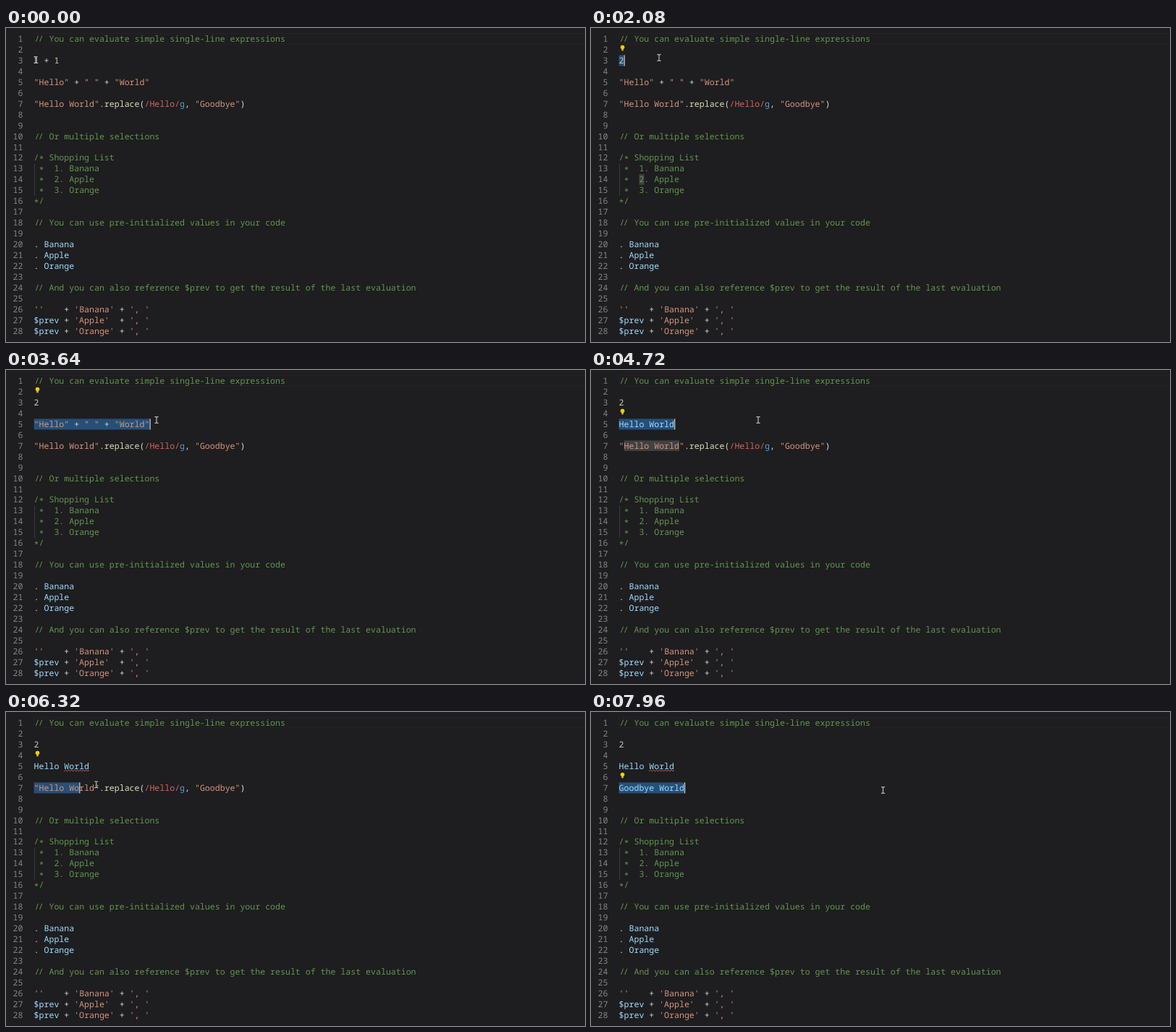
Animation, 800 px wide and 434 px high, one loop 8 s. Source, as an HTML page:

```html
<!DOCTYPE html>
<html lang="en">
<head>
<meta charset="utf-8">
<title>Evaluating expressions in an editor</title>
<style>
  html, body { margin: 0; width: 100%; height: 100%; overflow: hidden; background: #1e1d1f; }
  svg { display: block; width: 100vw; height: 100vh; }
  text {
    font: 500 11.59px "Noto Sans Mono", "DejaVu Sans Mono", monospace;
    white-space: pre; text-rendering: geometricPrecision; fill: #dadada;
  }
  .num { fill: #858585; text-anchor: end; font-weight: 400; }
  .comment { fill: #629650; font-weight: 400; }
  .string { fill: #d4957c; }
  .regex { fill: #d1665e; }
  .flag { fill: #569cd6; }
  .value { fill: #c0d2b4; }
  .name { fill: #9cdcfe; }
  .call { fill: #dcdcb4; }
</style>
</head>
<body>
<svg viewBox="0 0 800 434">
  <rect width="800" height="434" fill="#1e1d1f"/>
  <rect x="38.5" y="7.5" width="765" height="14.5" fill="none" stroke="#242325"/>
  <path d="M39.5 187.5V232" stroke="#3a3a3c"/>
  <rect id="match" height="14.5" fill="#404143"/>
  <rect id="selection" height="15" fill="#264f78"/>
  <g id="code"></g>
  <path id="squiggle" fill="none" stroke="#d8675c" stroke-width=".9"/>
  <rect id="caret" width="1.2" height="15" fill="#d0d0cc"/>
  <g id="bulb">
    <circle r="2.8" cy="-1" fill="#ffcc00"/>
    <path d="M-1.3 1.6h2.6v2.2h-2.6z" fill="#d9b866"/>
  </g>
  <g id="mouse">
    <path id="beam" d="M-2.5 -4.3H-1L0 -3.5L1 -4.3H2.5M0 -3.5V3.5M-2.5 4.3H-1L0 3.5L1 4.3H2.5"
      fill="none" stroke="#bcbcbc" stroke-width="1.2"/>
    <path id="arrow" d="M0 0V7.6L1.8 6L3 8.8L4.4 8.2L3.2 5.5H5.6Z"
      fill="#e8e8e8" stroke="#111" stroke-width=".6"/>
  </g>
</svg>
<script>
const LOOP = 8000, LEFT = 38.6, CHAR = 6.954, ROW = 14.98;
const $ = id => document.getElementById(id);
const rowY = row => 15 + (row - 1) * ROW;
const colX = col => LEFT + col * CHAR;

const source = `// You can evaluate simple single-line expressions

1 + 1

"Hello" + " " + "World"

"Hello World".replace(/Hello/g, "Goodbye")


// Or multiple selections

/* Shopping List
 *  1. Banana
 *  2. Apple
 *  3. Orange
*/

// You can use pre-initialized values in your code

. Banana
. Apple
. Orange

// And you can also reference $prev to get the result of the last evaluation

''    + 'Banana' + ', '
$prev + 'Apple'  + ', '
$prev + 'Orange' + ', '`.split("\n");

// Each step drags over a row, then replaces it with its result.
const steps = [
  { row: 3, start: 150, stop: 700, bulb: 1000, edit: 1800, result: "2", match: [14, 4] },
  { row: 5, start: 3000, stop: 3480, bulb: 3900, edit: 4480, result: "Hello World", match: [7, 1] },
  { row: 7, start: 6000, stop: 7030, bulb: 7100, edit: 7600, result: "Goodbye World" }
];

const mousePath = [
  [0, 41, 44], [150, 41, 44], [700, 94, 41], [2350, 94, 41], [2640, 34, 77],
  [2840, 37, 74], [3000, 37, 74], [3480, 208, 69], [3660, 208, 69], [3850, 231, 69],
  [5120, 231, 69], [5700, 41, 103], [5850, 41, 98], [6000, 41, 98], [7030, 403.5, 108]
];

const tokens = [
  ["string", /^("[^"]*"|'[^']*')/],
  ["regex", /^\/\w+\//],
  ["flag", /^g\b/],
  ["value", /^\d+/],
  ["name", /^(\$prev|[A-Z]\w*)/],
  ["call", /^[a-z]+/],
  ["", /^[^\w"'$\/]+/]
];

const span = (cls, text, shift = "") => `<tspan class="${cls}" ${shift}>${text}</tspan>`;

function highlight(line) {
  if (line.startsWith("//"))
    return span("comment", "/", 'dx=".9"') + span("comment", "/", 'dx="-1.7"') +
      span("comment", line.slice(2), 'dx=".8"');
  const star = line.match(/^( |\/)?\*(.*)$/);
  if (star)
    return (star[1] ? span("comment", star[1]) : "") + span("comment", "*", 'dy="2"') +
      (star[2] ? span("comment", star[2], 'dy="-2"') : "");
  let html = "";
  while (line) {
    const [cls, rule] = tokens.find(([, r]) => r.test(line));
    const text = line.match(rule)[0];
    html += span(cls, text);
    line = line.slice(text.length);
  }
  return html;
}

$("code").innerHTML = source.map((line, i) => {
  const y = rowY(i + 1) + 3.7;
  return `<text class="num" x="23.4" y="${y}">${i + 1}</text>` +
    `<text id="line${i + 1}" x="${LEFT}" y="${y}">${highlight(line)}</text>`;
}).join("");

let wave = `M${colX(6)} ${rowY(5) + 7}`;
for (let i = 0; i < 17; i++) wave += `l2.04 ${i % 2 ? 1.7 : -1.7}`;
$("squiggle").setAttribute("d", wave);

function mouseAt(t) {
  const i = mousePath.findIndex(p => p[0] > t);
  if (i < 0) return mousePath[mousePath.length - 1].slice(1);
  const [t0, x0, y0] = mousePath[i - 1], [t1, x1, y1] = mousePath[i];
  const u = (t - t0) / (t1 - t0), s = u * u * (3 - 2 * u);
  return [x0 + (x1 - x0) * s, y0 + (y1 - y0) * s];
}

function show(id, on) { $(id).style.display = on ? "" : "none"; }

function place(id, row, col, length) {
  const el = $(id);
  el.setAttribute("x", colX(col));
  el.setAttribute("y", rowY(row) - 7.5);
  if (length !== undefined) el.setAttribute("width", length * CHAR);
}

function setLine(row, text) {
  const el = $("line" + row);
  if (el.dataset.text === text) return;
  el.dataset.text = text;
  el.innerHTML = highlight(text);
}

function draw(t) {
  for (const s of steps) setLine(s.row, t < s.edit ? source[s.row - 1] : s.result);

  const step = steps.filter(s => t >= s.start).pop();
  show("selection", step);
  show("caret", false);
  show("match", false);
  if (step) {
    const { row, start, stop, edit, result, match } = step;
    const edited = t >= edit;
    const full = edited ? result.length : source[row - 1].length;
    // The selection trails the pointer slightly.
    const seen = mouseAt(Math.max(start, Math.min(t, stop + 50) - 50))[0];
    const col = edited ? full : Math.max(0, Math.min(full, Math.round((seen - LEFT) / CHAR)));
    place("selection", row, 0, col);
    place("caret", row, col);
    const idle = t - (edited ? edit : stop);
    show("caret", idle < 0 || idle % 1000 < 500);
    if (match && t >= edit + 160) {
      place("match", ...match, full);
      show("match", true);
    }
  }

  const lit = steps.filter(s => t >= s.bulb).pop();
  show("bulb", lit);
  if (lit) $("bulb").setAttribute("transform", `translate(43.5 ${rowY(lit.row - 1) - 2.4})`);
  show("squiggle", t >= 5200);

  const [x, y] = mouseAt(t);
  $("mouse").setAttribute("transform", `translate(${x} ${y})`);
  show("arrow", x < LEFT);
  show("beam", x >= LEFT);
}

function tick() {
  draw(performance.now() % LOOP);
  requestAnimationFrame(tick);
}
tick();
</script>
</body>
</html>
```
